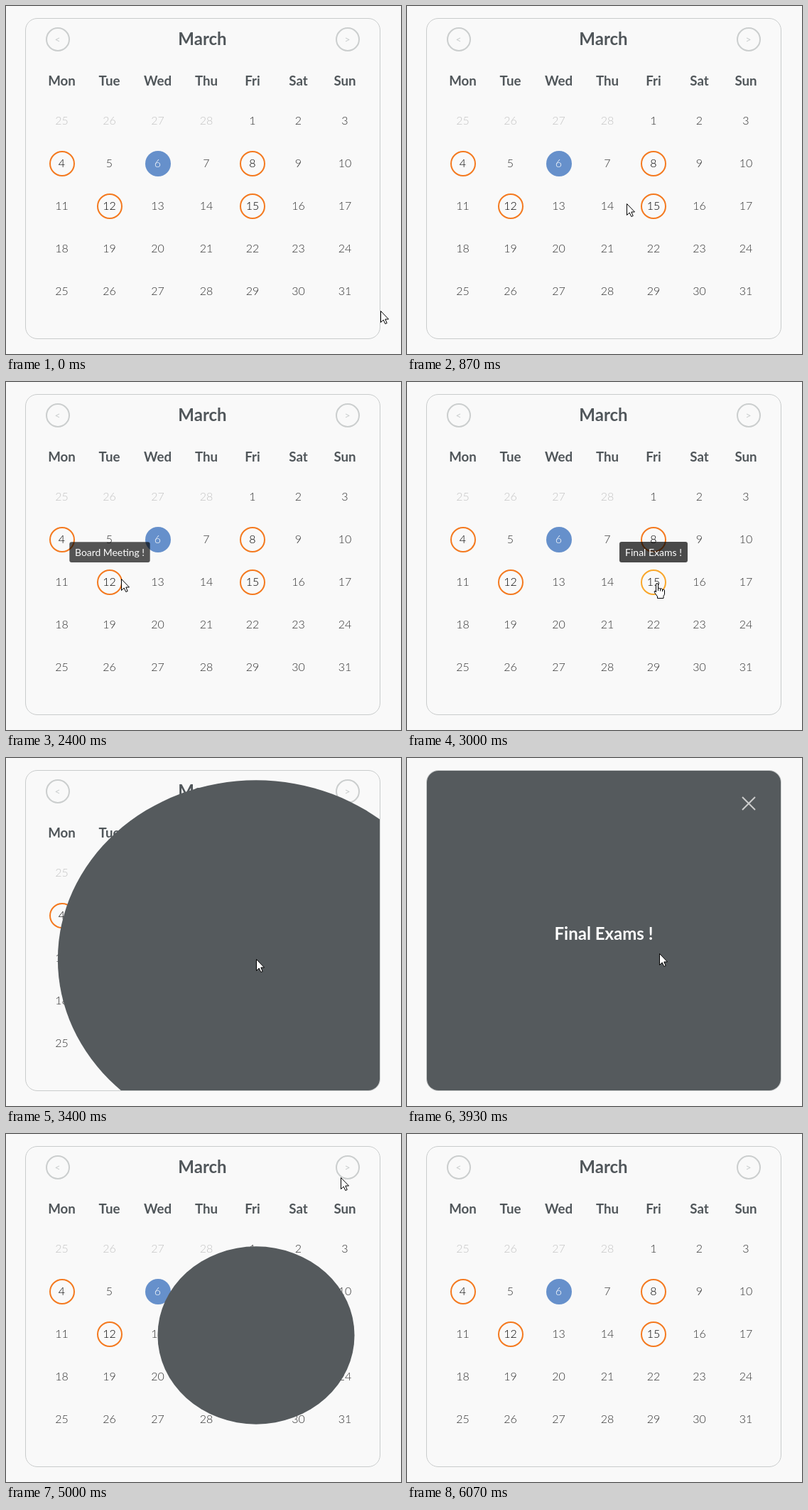
These frames come from a looping animation (556 px wide and 490 px high, 6.54 s). An HTML page:

```html
<!DOCTYPE html>
<html lang="en">
<head>
<meta charset="utf-8">
<title>Event calendar</title>
<style>
  html, body { margin: 0; width: 100%; height: 100%; overflow: hidden; background: #f9f9f9; }
  svg { display: block; width: 556px; height: 490px; }
  text { font-family: Lato, "Open Sans", sans-serif; text-anchor: middle; }
  .title { font-size: 24px; font-weight: 700; fill: #50565a; }
  .weekday { font-size: 18.72px; font-weight: 700; fill: #50565a; }
  .day { font-size: 16px; font-weight: 300; fill: #333; }
  .other { fill: #c4c4c4; }
  .event { fill: #000; }
  .today { fill: #fff; }
  .nav { font-size: 14px; fill: #c8cccc; }
  .tip { font-size: 14px; fill: #fff; }
</style>
</head>
<body>
<svg id="stage" viewBox="0 0 556 490"></svg>
<script>
const LOOP = 6540;
const FADE = 200;
const COLUMNS = [78.5, 145.5, 213.5, 282, 347, 411.5, 477];
const WEEKDAYS = ["Mon", "Tue", "Wed", "Thu", "Fri", "Sat", "Sun"];
const ORANGE = "#f47a20", AMBER = "#f9a72b", SLATE = "#555a5d";
const stage = document.getElementById("stage");

function add(parent, tag, attrs, text) {
  const node = document.createElementNS("http://www.w3.org/2000/svg", tag);
  set(node, attrs);
  if (text !== undefined) node.textContent = text;
  parent.append(node);
  return node;
}
function set(node, attrs) {
  for (const key in attrs) node.setAttribute(key, attrs[key]);
}
const label = (parent, x, y, cls, text) => add(parent, "text", { x, y, class: cls }, text);
const clamp = v => Math.min(1, Math.max(0, v));
const smooth = v => v * v * (3 - 2 * v);

// CSS ease-in-out: cubic-bezier(.42, 0, .58, 1)
function easeInOut(x) {
  if (x <= 0 || x >= 1) return clamp(x);
  let low = 0, high = 1, s;
  for (let i = 0; i < 24; i++) {
    s = (low + high) / 2;
    const bx = 1.26 * s * (1 - s) ** 2 + 1.74 * s * s * (1 - s) + s ** 3;
    if (bx < x) low = s; else high = s;
  }
  return smooth(s);
}

// Card and month grid
const clip = add(add(stage, "defs", {}), "clipPath", { id: "card" });
add(clip, "rect", { x: 28, y: 18, width: 498, height: 450, rx: 16 });
add(stage, "rect", { x: 27.5, y: 17.5, width: 499, height: 451, rx: 16.5, fill: "#f9f9f9", stroke: "#c9cccc" });
label(stage, 276.5, 55, "title", "March");
for (const [x, sign] of [[73, "<"], [481, ">"]]) {
  add(stage, "circle", { cx: x, cy: 47, r: 16, fill: "none", stroke: "#cbcece", "stroke-width": 2 });
  label(stage, x - 0.5, 52, "nav", sign);
}
WEEKDAYS.forEach((name, i) => label(stage, COLUMNS[i], 112, "weekday", name));

// Event days; hovers are [enter, leave] times
const events = [
  { day: 4, x: 79, y: 222, hovers: [] },
  { day: 8, x: 347, y: 222, text: "Clara's Marriage", width: 118, hovers: [[1200, 1785]] },
  { day: 12, x: 146, y: 282, text: "Board Meeting !", width: 114, hovers: [[330, 430], [2030, 2390]] },
  { day: 15, x: 347, y: 282, text: "Final Exams !", width: 96, hovers: [[2740, 3090]] }
];
add(stage, "circle", { cx: 214, cy: 222, r: 18, fill: "#6690cb" });
for (const e of events) {
  e.ring = add(stage, "circle", { cx: e.x, cy: e.y, r: 17, fill: "none", "stroke-width": 2 });
}
for (let i = 0; i < 35; i++) {
  const day = i < 4 ? 25 + i : i - 3;
  let cls = "day";
  if (i < 4) cls += " other";
  else if (day === 6) cls += " today";
  else if (events.some(e => e.day === day)) cls += " event";
  label(stage, COLUMNS[i % 7], 167 + 60 * Math.floor(i / 7), cls, day);
}
for (const e of events.filter(e => e.text)) {
  e.tip = add(stage, "g", {});
  add(e.tip, "rect", { x: -e.width / 2, y: -39, width: e.width, height: 29, rx: 3, fill: "#000", "fill-opacity": 0.7 });
  label(e.tip, 0, -19, "tip", e.text);
}

// Detail view that grows out of the clicked day
const overlay = add(stage, "g", { "clip-path": "url(#card)" });
const blob = add(overlay, "ellipse", { cx: 352, cy: 283.5, fill: SLATE });
const detail = add(overlay, "g", {});
label(detail, 277, 256, "title", "Final Exams !").style.fill = "#fff";
const closeIcon = add(detail, "path", { d: "M472 55 490 73M490 55 472 73", "stroke-width": 2 });

// Mouse pointers, each with its hot spot at 0,0
const ink = { fill: "#fff", stroke: "#000", "stroke-width": 1, "stroke-linejoin": "round" };
const arrow = add(stage, "path", { ...ink, d: "M.5.5V16.5L4.2 13 6.8 18.5 9.2 17.5 6.8 12H11.5Z" });
const hand = add(stage, "g", {});
add(hand, "path", {
  ...ink,
  d: "M-1.5 2Q-1.5.5 0 .5T1.5 2V8Q2 6.5 4.5 8 6 7 7.5 9 10.5 8.5 10.5 11V15Q10.5 17 9 18.5V21.5H.5V19L-3.5 13.5Q-4.5 11.5-3 11.2-2 11-1.5 13Z"
});
add(hand, "path", { d: "M1.5 8V11M4.5 8V11.5M7.5 9V12", stroke: "#000", fill: "none" });

// Pointer path: time, x, y
const path = [
  [0, 527, 429], [50, 527, 429], [380, 160, 292], [670, 300, 294],
  [1330, 342, 223], [1400, 340, 222], [1730, 340, 222], [2130, 152, 277],
  [2340, 152, 277], [2800, 350, 283], [3000, 352, 283], [3870, 351, 283],
  [4400, 470, 63], [4530, 471, 61], [5010, 471, 61], [5530, 175, 420], [6070, 59, 490]
];
function pointerAt(t) {
  const i = Math.max(1, path.findIndex(p => p[0] > t));
  const [t0, x0, y0] = path[i - 1], [t1, x1, y1] = path[i];
  const k = smooth(clamp((t - t0) / (t1 - t0)));
  return [x0 + (x1 - x0) * k, y0 + (y1 - y0) * k];
}

const within = (t, [from, to]) => t >= from && t < to;

function tipAmount(t, [from, to]) {
  const shown = clamp((Math.min(t, to) - from) / FADE);
  return clamp(shown - Math.max(0, t - to) / FADE);
}

function radiusAt(t) {
  return t < 4660 ? 1000 * easeInOut((t - 3035) / 1000)
                  : 1000 * (1 - easeInOut((t - 4660) / 460));
}

function draw(t) {
  const onClose = within(t, [4330, 4670]);
  let pointing = onClose;
  for (const e of events) {
    const hovered = e.hovers.some(h => within(t, h));
    pointing = pointing || hovered;
    set(e.ring, { stroke: hovered ? AMBER : ORANGE });
    if (!e.tip) continue;
    const amount = Math.max(...e.hovers.map(h => tipAmount(t, h)));
    set(e.tip, {
      opacity: amount,
      transform: `translate(${e.x} ${e.y - 18}) scale(${0.9 + 0.1 * amount})`
    });
  }

  const radius = radiusAt(t);
  set(blob, { rx: radius, ry: radius / 1.107 });
  set(detail, { opacity: t < 3730 ? 0 : 1 - clamp((t - 4630) / 100) });
  set(closeIcon, { stroke: onClose ? "#fff" : "#ccc" });

  const [x, y] = pointerAt(Math.min(t, 6069));
  const place = `translate(${Math.round(x)} ${Math.round(y)})`;
  const visible = t < 6065;
  set(arrow, { transform: place, opacity: visible && !pointing ? 1 : 0 });
  set(hand, { transform: place, opacity: visible && pointing ? 1 : 0 });
}

const start = performance.now();
function tick() {
  draw((performance.now() - start) % LOOP);
  requestAnimationFrame(tick);
}
tick();
</script>
</body>
</html>
```
